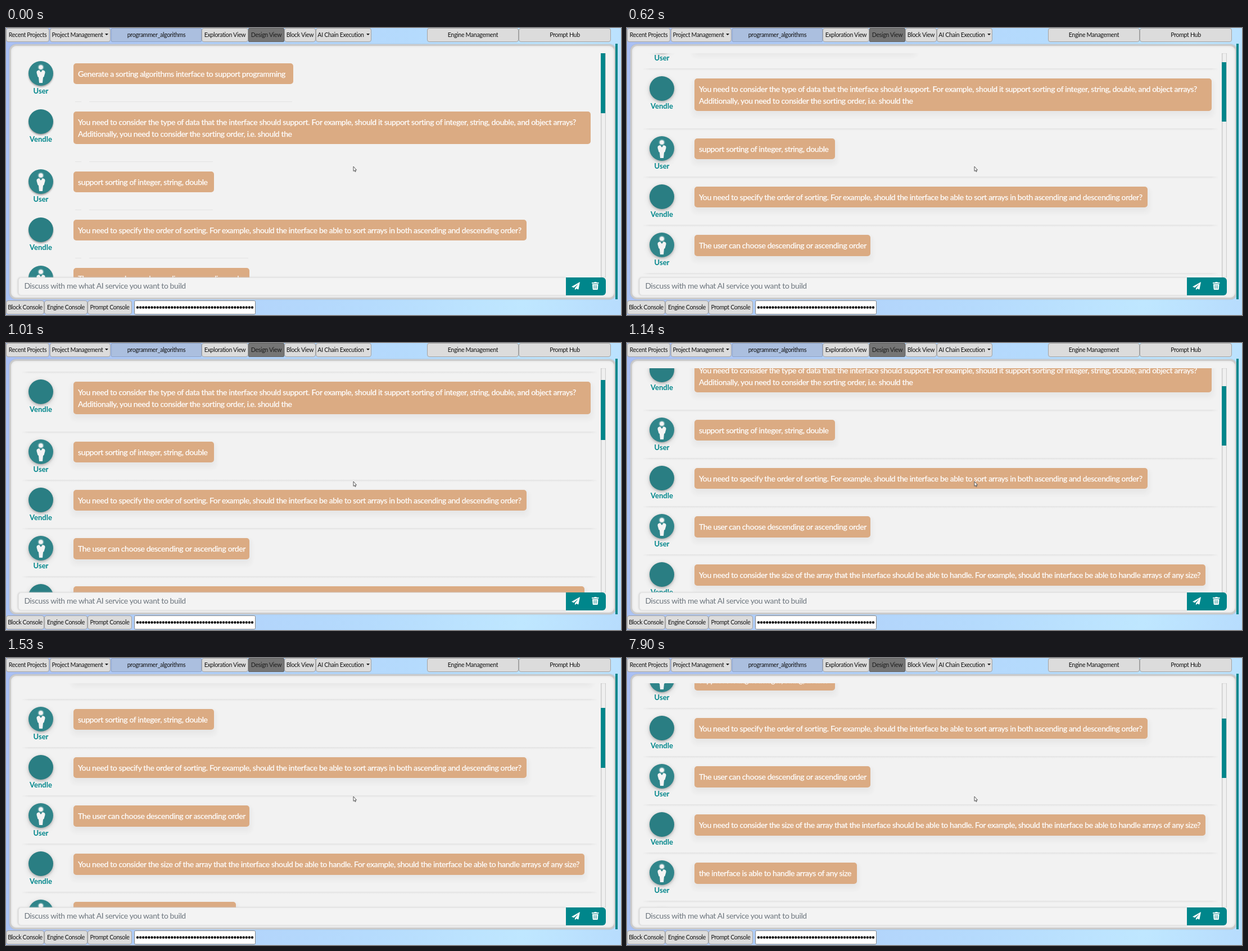
Write an HTML page that moves like this. It is 1094 px wide and 512 px high and loops after 8 s.

```html
<!DOCTYPE html>
<html lang="en">
<head>
<meta charset="utf-8">
<title>Chat scroll</title>
<style>
  html, body { margin: 0; width: 100%; height: 100%; overflow: hidden; }
  body { font-family: Lato, sans-serif; }
  #stage {
    position: relative; width: 1094px; height: 512px; overflow: hidden;
    background: linear-gradient(100deg, #a9bff4 0, #b1d0fa 30%, #b5dbfd 62%, #bfe7ff 85%, #b7dcfd 100%);
  }
  #stage div, #stage svg { position: absolute; box-sizing: border-box; white-space: pre; }

  .tab {
    border: 1px solid #a3a3a3; border-radius: 4px; background: #dcdcdc; color: #111;
    font-size: 10.6px; letter-spacing: -.33px; line-height: 22px; text-align: center;
  }
  .tab.project { background: #abbfdf; border-color: #8fa3c6; border-radius: 2px; }
  .tab.current { background: #757575; border-color: #666; color: #1c1c1c; border-radius: 2px; }
  .tab i {
    display: inline-block; margin-left: 4px; vertical-align: 3px;
    border: 3px solid transparent; border-top-color: #111; border-bottom: 0;
  }
  .panel {
    background: #f2f2f2; border: 3px solid #cbcbcb; border-radius: 12px;
    box-shadow: 0 0 2px #aaa, inset 0 0 4px #ddd;
  }
  .teal { background: #00868b; }

  .bubble {
    background: #dbab83; color: #fff; border-radius: 5px; padding: 8px 8.5px;
    font-size: 14px; letter-spacing: -.37px; line-height: 21px;
    -webkit-text-stroke: .25px #fff;
    box-shadow: 0 6px 4px 7px rgba(0, 0, 0, .018), 0 5px 8px rgba(0, 0, 0, .03);
  }
  .avatar {
    border-radius: 50%; background: #30858a;
    box-shadow: 0 2px 4px rgba(0, 0, 0, .28), 0 3px 6px 6px rgba(0, 0, 0, .03);
  }
  .avatar.bot { background: #2a7e83; }
  .name { color: #00868b; font-size: 13px; font-weight: 700; line-height: 16px; text-align: center; }
  .rule {
    background: linear-gradient(#e2e2e2, #e9e9e9 45%, #f2f2f2);
    -webkit-mask: linear-gradient(90deg, transparent, #000 12px, #000 calc(100% - 12px), transparent);
    mask: linear-gradient(90deg, transparent, #000 12px, #000 calc(100% - 12px), transparent);
  }
  .faint { background: #e3e3e3; display: none; }
  .track { background: #f0f0f0; box-shadow: inset 1px 0 2px #bbb, inset -1px 0 1px #ccc; }

  /* At rest before the first scroll the soft shadows are absent. */
  .flat .bubble { box-shadow: none; }
  .flat .avatar { box-shadow: 0 2px 3px rgba(0, 0, 0, .35); }
  .flat .rule { display: none; }
  .flat .faint { display: block; }

  .field {
    background: #f3f3f3; border: 1px solid #e5e5e5; border-radius: 5px 0 0 5px;
    box-shadow: -1px 0 3px #ccc; color: #6c757d; padding-left: 9.5px;
    font-size: 13.9px; letter-spacing: -.35px; line-height: 28px;
  }
</style>
</head>
<body>
<div id="stage"></div>
<script>
const LOOP = 8000;
const SCROLL_STEPS = [
  [0, 0], [500, 20], [620, 59], [740, 60], [1010, 80], [1140, 119],
  [1260, 120], [1530, 165], [1650, 180], [7900, 235]
];
const VIEW_TOP = 45, BUBBLE_X = 119.5, BUBBLE_Y = 62.6, THUMB_RATIO = 0.267;

const USER = 'User', BOT = 'Vendle';
const MESSAGES = [
  [USER, 392, 'Generate a sorting algorithms interface to support programming'],
  [BOT, 921, 'You need to consider the type of data that the interface should support. For example, should it support sorting of integer, string, double, and object arrays?\nAdditionally, you need to consider the sorting order, i.e. should the'],
  [USER, 251, 'support sorting of integer, string, double'],
  [BOT, 807, 'You need to specify the order of sorting. For example, should the interface be able to sort arrays in both ascending and descending order?'],
  [USER, 314, 'The user can choose descending or ascending order'],
  [BOT, 910, 'You need to consider the size of the array that the interface should be able to handle. For example, should the interface be able to handle arrays of any size?'],
  [USER, 290, 'the interface is able to handle arrays of any size'],
  [BOT, 807, '']
];

const TABS = [
  [0, 77, 'Recent Projects'], [78, 108, 'Project Management', 'menu'],
  [187, 161, 'programmer_algorithms', 'project'], [348, 83, 'Exploration View'],
  [431, 64, 'Design View', 'current'], [495, 56, 'Block View'],
  [551, 99, 'AI Chain Execution', 'menu'],
  [749, 163, 'Engine Management'], [912, 164, 'Prompt Hub']
];
const CONSOLES = [[0, 68, 'Block Console'], [68, 77, 'Engine Console'], [145, 79, 'Prompt Console']];

const stage = document.getElementById('stage');

function box(parent, x, y, w, h, className = '', text = '') {
  const el = document.createElement('div');
  el.className = className;
  el.style.cssText = `left:${x}px;top:${y}px;width:${w}px;height:${h}px`;
  el.textContent = text;
  parent.append(el);
  return el;
}

function drawing(parent, x, y, w, h, shapes) {
  parent.insertAdjacentHTML('beforeend',
    `<svg style="left:${x}px;top:${y}px" width="${w}" height="${h}" viewBox="0 0 ${w} ${h}">${shapes}</svg>`);
}

function tab(y, [x, w, text, kind = '']) {
  const el = box(stage, x, y, w, 25, 'tab ' + kind, text);
  if (kind === 'menu') el.append(document.createElement('i'));
}

const PERSON = `
  <circle cx="22" cy="11" r="5.5" fill="#6ea9ac"/>
  <circle cx="22" cy="11" r="3.8" fill="#f4f4f4"/>
  <path d="M16 17 L19 16 L22 20 L25 16 L28 17 Q30 18 29.5 21 L27.5 28 L26 29 L25 39 H19 L18 29 L16.5 28 L14.5 21 Q14 18 16 17Z" fill="#f4f4f4"/>`;

function buildMessages(list) {
  let y = BUBBLE_Y - VIEW_TOP;
  MESSAGES.forEach(([who, width, text], i) => {
    const extra = text.includes('\n') ? 21 : 0;
    const ruleY = y + 68 + extra;
    const next = MESSAGES[i + 1] || MESSAGES[i];
    box(list, 28, ruleY, 1024, 4, 'rule');
    box(list, 123, ruleY, 11, 1, 'faint');
    box(list, 148, ruleY, Math.min(width, next[1]) - 31, 1, 'faint');

    const avatar = box(list, 40, y - 4, 44, 44, who === BOT ? 'avatar bot' : 'avatar');
    if (who === USER) drawing(avatar, 0, 0, 44, 44, PERSON);
    box(list, 30, y + 41, 64, 16, 'name', who);
    box(list, BUBBLE_X, y, width - .5, 37.5 + extra, 'bubble', text);
    y += 86.1 + extra;
  });
}

TABS.forEach(t => tab(0, t));
CONSOLES.forEach(t => tab(485.5, t));

drawing(stage, 228, 486, 216, 25, `
  <rect x=".5" y=".5" width="215" height="24" rx="2" fill="#fff" stroke="#858585"/>
  <path d="M6 12.5H210.5" stroke="#000" stroke-width="4.4" stroke-linecap="round" stroke-dasharray="0 5.1"/>`);

box(stage, 6, 29, 1079, 455, 'panel');
box(stage, 1084, 28, 4, 456, 'teal');

const view = box(stage, 10, VIEW_TOP, 1057, 400);
view.style.overflow = 'hidden';
const list = box(view, -10, 0, 1094, 800);
buildMessages(list);
box(view, 1048, 0, 8.5, 400, 'track');
const thumb = box(view, 1048, 0, 8.3, 106.5, 'teal');

box(stage, 22, 445, 975, 32, 'field', 'Discuss with me what AI service you want to build');
box(stage, 996, 445, 70.5, 31.5, 'teal').style.borderRadius = '0 6px 6px 0';
drawing(stage, 1006, 453, 16, 15, `
  <path d="M15 0L0 8.5L4 10.2L12.3 3.2L6 11V14.5L8.3 12L12.3 13.5Z" fill="#fff"/>`);
drawing(stage, 1042, 453, 13, 15, `
  <path d="M0 1H4L5 0H8L9 1H12.5V2.8H0ZM1 3.7H11.5L10.9 12.5Q10.8 14 9.5 14H3Q1.7 14 1.6 12.5Z" fill="#fff"/>
  <path d="M4 5.5V12M6.25 5.5V12M8.5 5.5V12" stroke="#00868b" stroke-width=".8"/>`);

drawing(stage, 617, 246, 8, 12, `
  <path d="M1 1V9.5L2.8 7.8L4 10.5L5.3 10L4.2 7.3H6.5Z" fill="#fff" stroke="#444" stroke-width=".9"/>`);

function render(time) {
  let scroll = 0;
  for (const [start, offset] of SCROLL_STEPS) if (time >= start) scroll = offset;
  list.style.top = -scroll + 'px';
  thumb.style.top = scroll * THUMB_RATIO + 'px';
  stage.classList.toggle('flat', scroll === 0);
}

const begin = performance.now();
function tick() {
  render((performance.now() - begin) % LOOP);
  requestAnimationFrame(tick);
}
tick();
</script>
</body>
</html>
```
